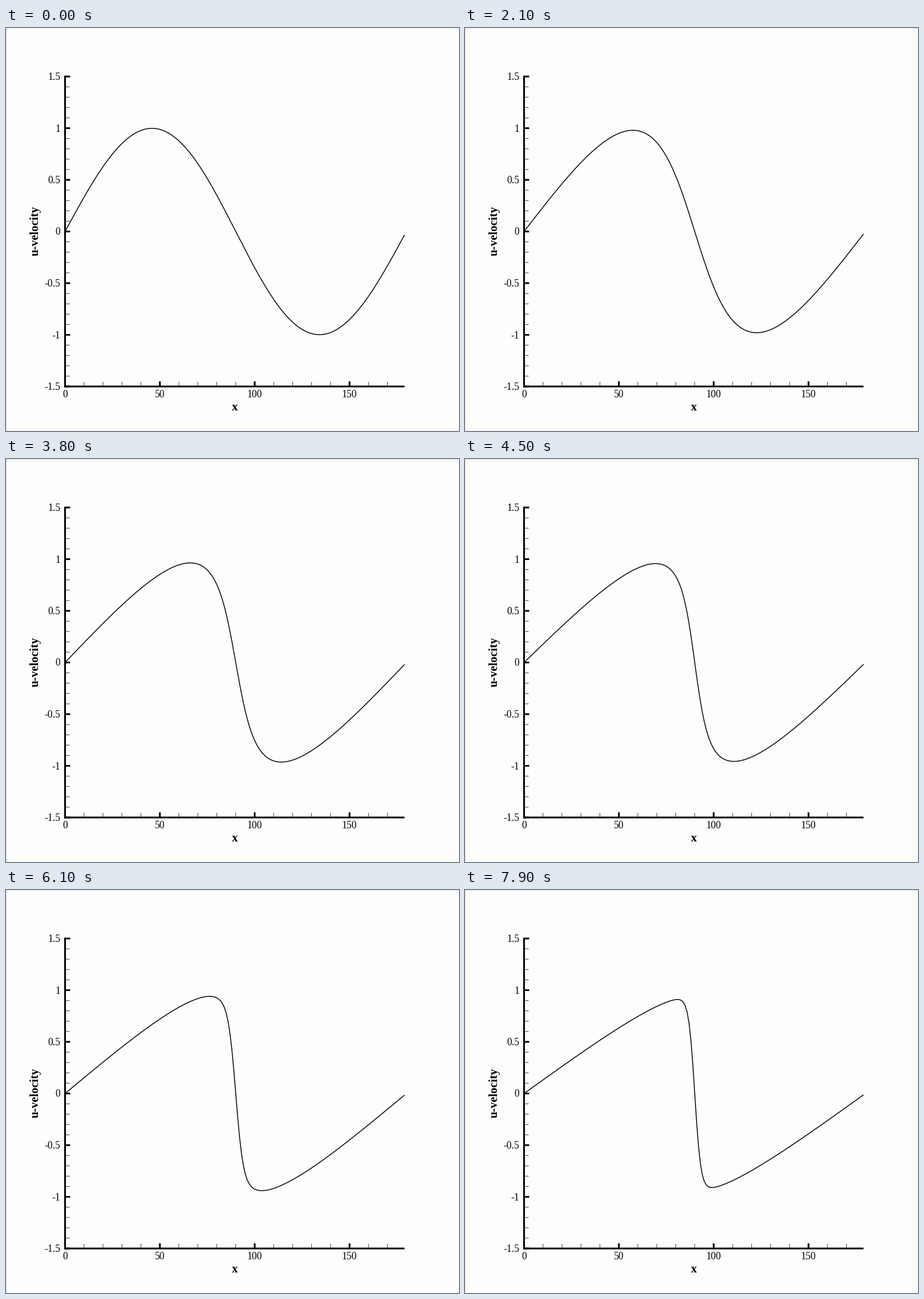
Animation, 794 px wide and 706 px high, one loop 8 s. Source, as a matplotlib script:

```python
import numpy as np
import matplotlib.pyplot as plt
from matplotlib.animation import FuncAnimation

W, H, DPI = 794, 706, 64
FRAMES, INTERVAL = 80, 100
PT = 72 / DPI                      # points per pixel

# Viscous Burgers equation on a periodic grid
N, NU, DT = 180, 0.05, 0.01
STEPS, LEAD = 2, 3                 # steps per frame, steps before the start
DX = 2 * np.pi / N

# Plot geometry in pixels
X0, XS, X_END = 103, 3.324, 698
Y0, YS = 356, 181
TOP, BOTTOM = Y0 - 1.5 * YS, Y0 + 1.5 * YS
TICK = 8


def px(x):
    return X0 + XS * x


def py(u):
    return Y0 - YS * u


def step(u):
    left, right = np.roll(u, 1), np.roll(u, -1)
    flux = (right ** 2 - left ** 2) / (4 * DX)
    return u + DT * (NU * (right - 2 * u + left) / DX ** 2 - flux)


def solve():
    u = np.sin(DX * np.arange(N))
    states = [u]
    for _ in range(FRAMES * STEPS + LEAD):
        u = step(u)
        states.append(u)
    return states[LEAD::STEPS]


fig = plt.figure(figsize=(W / DPI, H / DPI), dpi=DPI, facecolor="#fdfdfc")
ax = fig.add_axes([0, 0, 1, 1])
ax.set_xlim(-0.5, W - 0.5)
ax.set_ylim(H - 0.5, -0.5)
ax.axis("off")


def line(xs, ys, width, color="black"):
    # Snapping would push lines off by up to a pixel
    return ax.plot(xs, ys, color=color, lw=width * PT, snap=False,
                   solid_capstyle="butt", solid_joinstyle="round")[0]


def label(x, y, text, size=17.6, **kw):
    ax.text(x, y, text, family="Liberation Serif", fontsize=size * PT,
            va="baseline", rotation_mode="anchor", **kw)


def tick(xs, ys, major):
    line(xs, ys, 3 if major else 1, "black" if major else "#333333")


# Faint edge along the top and left
line([0, W], [0, 0], 1, "#dcdce8")
line([0, 0], [0, H], 1, "#dcdce8")

# Axes
line([X0, X0], [TOP - 1.5, BOTTOM + 1.5], 3)
line([X0 - 1.5, X_END], [BOTTOM, BOTTOM], 3)

for i in range(-15, 16):
    major = i % 5 == 0
    y = py(i / 10)
    tick([X0, X0 + TICK + major], [y, y], major)
    if major:
        label(95, y + 6, f"{i / 10:g}", ha="right")

for v in range(0, N, 10):
    major = v % 50 == 0
    x = px(v)
    if v:
        tick([x, x], [BOTTOM, BOTTOM - TICK - major], major)
    if major:
        label(x, 646.5, str(v), ha="center")

label(401, 669.5, "x", 21, weight="bold", ha="center")
label(56, Y0 - 1, "u-velocity", 21, weight="bold", ha="center", rotation=90)

waves = solve()
curve = line(px(np.arange(N)), py(waves[0]), 1.5)


def update(frame):
    curve.set_ydata(py(waves[frame]))
    return [curve]


anim = FuncAnimation(fig, update, frames=FRAMES, interval=INTERVAL,
                     repeat=True, repeat_delay=0, blit=False)
plt.show()
```
